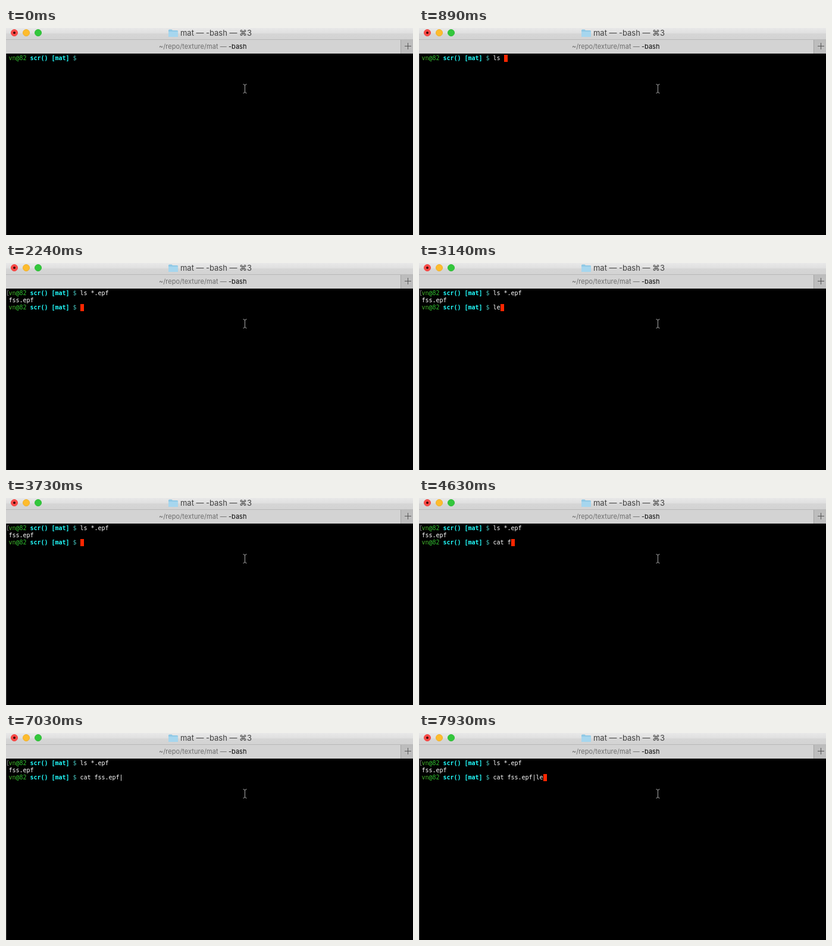
Recreate the animation shown at these times as an HTML page. Size 684x348 px, loop 8000 ms.

```html
<!DOCTYPE html>
<html lang="en">
<head>
<meta charset="utf-8">
<title>Terminal</title>
<style>
  html, body { margin: 0; width: 100%; height: 100%; overflow: hidden; background: #000; }
  svg { display: block; width: 684px; height: 348px; }
  text { white-space: pre; }
  .ui { font-family: Inter, Roboto, sans-serif; }
  .title { font-size: 13px; fill: #404040; letter-spacing: -.03px; }
  .tab { font-size: 11px; fill: #6c6c6c; letter-spacing: .05px; }
  .tab tspan { fill: #080808; }
  .term { font: 10px "DejaVu Sans Mono", "Noto Sans Mono", monospace; letter-spacing: -.02px; fill: #fff; }
  .user { fill: #46b32c; }
  .at { fill: #38d436; }
  .host { fill: #30be30; }
  .path { fill: #2ff; font-weight: bold; }
  .sign { fill: #45c4be; }
  .mark { fill: none; stroke: #777; }
</style>
</head>
<body>
<svg viewBox="0 0 684 348">
  <defs>
    <linearGradient id="bar" x1="0" y1="0" x2="0" y2="1">
      <stop offset="0" stop-color="#e8e8e8"/>
      <stop offset=".42" stop-color="#e0e0e0"/>
      <stop offset=".48" stop-color="#d6d6d6"/>
      <stop offset="1" stop-color="#d2d2d2"/>
    </linearGradient>
    <g id="prompt">
      <text class="term"><tspan class="user">vn</tspan><tspan class="at">@</tspan><tspan class="host">82</tspan> <tspan class="path">scr() [mat]</tspan> <tspan class="sign">$</tspan></text>
    </g>
  </defs>

  <rect width="684" height="348"/>
  <rect y="43" width="1" height="305" fill="#3a3a3a"/>

  <rect width="684" height="20" fill="url(#bar)"/>
  <g stroke-width="1">
    <circle cx="14" cy="8" r="5.5" fill="#fc4b48" stroke="#f04442"/>
    <circle cx="14" cy="8" r="2" fill="#3c0505"/>
    <circle cx="34" cy="8" r="5.5" fill="#fdbc2e" stroke="#f0b02a"/>
    <circle cx="54" cy="8" r="5.5" fill="#33c73c" stroke="#2cbb35"/>
  </g>
  <path d="M273 4q0-1.500 1.500-1.500h4l1.500 1.500h7.500q1.500 0 1.500 1.500v8q0 1.500-1.500 1.500h-13q-1.500 0-1.500-1.500z" fill="#8fc9e6"/>
  <path d="M273 6h16v7.500q0 1.500-1.500 1.500h-13q-1.500 0-1.500-1.500z" fill="#a6d6ee"/>
  <text class="ui title" x="293" y="13">mat — -bash — ⌘3</text>

  <rect y="19" width="684" height="1" fill="#b8b8b8"/>
  <rect y="20" width="684" height="23" fill="#d3d3d3"/>
  <rect x="664" y="20" width="20" height="23" fill="#bdbdbd"/>
  <rect x="663" y="20" width="1" height="23" fill="#a3a3a3"/>
  <path d="M670 30.500h11M675.500 25v11" stroke="#555"/>
  <text class="ui tab" x="257" y="35">~/repo/texture/mat — <tspan>-bash</tspan></text>

  <use href="#prompt" x="4.500" y="54"/>
  <text class="term" id="first" x="124.500" y="54"></text>
  <g id="after">
    <path class="mark" d="M4.500 46.500h-2v8h2"/>
    <text class="term" x="4.500" y="66">fss.epf</text>
    <use href="#prompt" x="4.500" y="78"/>
    <text class="term" id="second" x="124.500" y="78"></text>
  </g>
  <rect id="caret" width="6" height="12" fill="#ff2600"/>

  <path d="M398.500 94.500q3 0 3 2.500v10q0 2.500-3 2.500M404.500 94.500q-3 0-3 2.500v10q0 2.500 3 2.500" fill="none" stroke="#aaa"/>
</svg>
<script>
  const LOOP = 8000, ENTER = 2240, CELL = 6;
  const LIST = "ls *.epf", CAT = "cat fss.epf|le";

  // [time, typed text]
  const steps = [[0, ""]];
  const type = (start, text, counts) =>
    counts.forEach((n, i) => steps.push([start + i * 150, text.slice(0, n)]));
  type(740, LIST, [1, 3, 4, 5, 6, 7, 8]);
  type(ENTER, "", [0]);
  type(2990, "les", [1, 2, 3]);
  type(3730, "", [0]);
  type(4180, CAT, [1, 3, 4, 5, 6, 8, 9, 11]);
  type(5530, CAT, [12]);
  type(7930, CAT, [14]);

  const el = id => document.getElementById(id);
  const first = el("first"), second = el("second"), after = el("after"), caret = el("caret");
  const show = (node, on) => node.setAttribute("visibility", on ? "visible" : "hidden");
  const put = (node, text) => { if (node.textContent !== text) node.textContent = text; };

  function draw(t) {
    const typed = steps.filter(s => s[0] <= t).pop()[1];
    const entered = t >= ENTER;
    put(first, entered ? LIST : typed);
    put(second, entered ? typed : "");
    show(after, entered);
    caret.setAttribute("x", 125 + CELL * typed.length);
    caret.setAttribute("y", entered ? 69 : 45);
    show(caret, t >= 440 && !(t >= 7030 && t < 7480));
  }

  const start = performance.now();
  function tick() {
    draw((performance.now() - start) % LOOP);
    requestAnimationFrame(tick);
  }
  tick();
</script>
</body>
</html>
```
